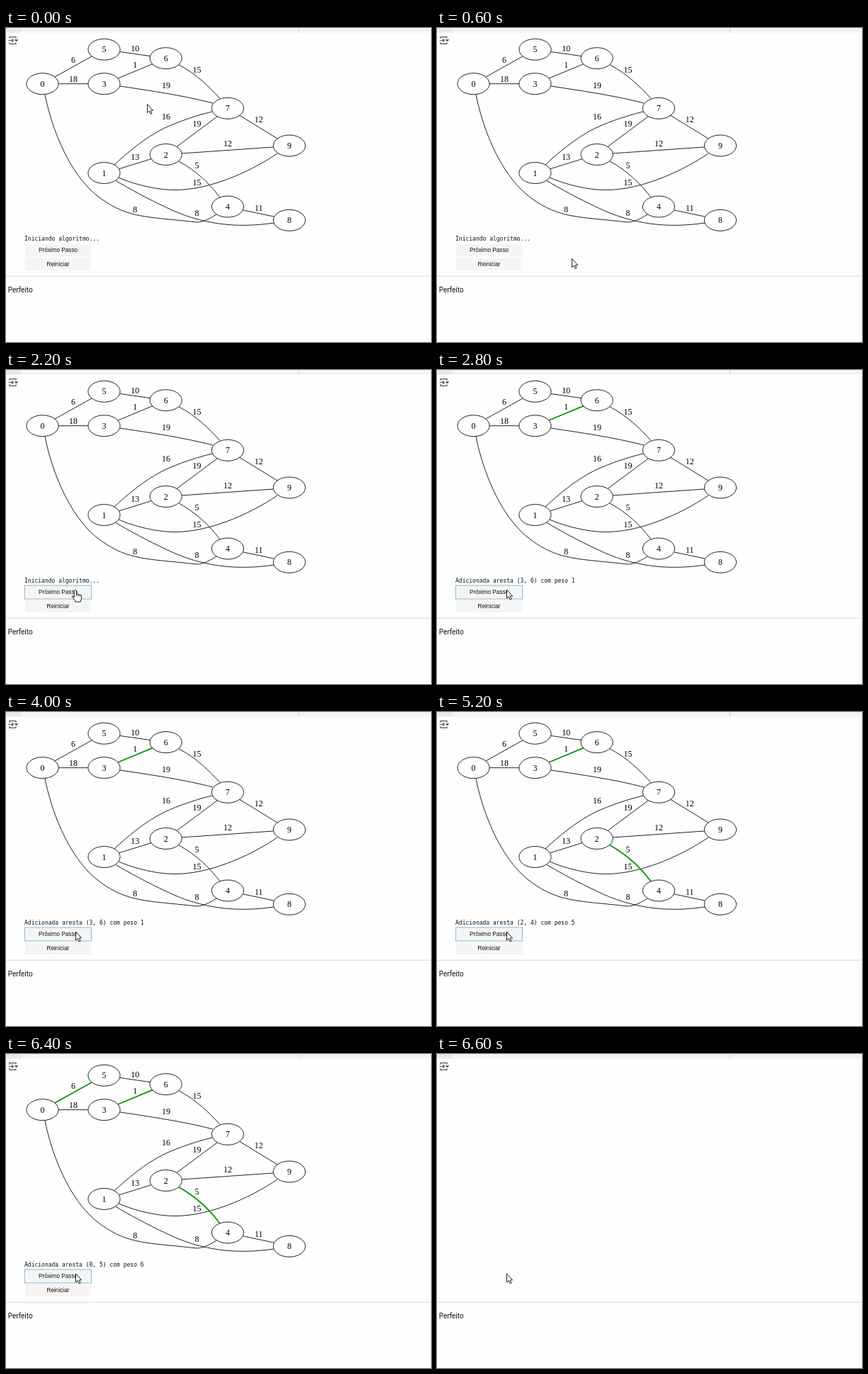
Write an HTML page that moves like this. It is 600 px wide and 443 px high and loops after 8000 ms.

```html
<!DOCTYPE html>
<html lang="pt">
<head>
<meta charset="utf-8">
<style>
html, body { margin: 0; width: 100%; height: 100%; overflow: hidden; background: #fefefe; }
svg { display: block; }
text { fill: #111; }
#graph { fill: none; stroke: #222; stroke-width: 1; }
#graph text { font: 12px "Liberation Serif", serif; text-anchor: middle; fill: #000; stroke: none; }
#graph .added { stroke: #0a930a; stroke-width: 1.8; }
#status { font: 8px "DejaVu Sans Mono", monospace; white-space: pre; }
.button { fill: #f5f5f5; }
.caption { font: 8.2px "Liberation Sans", sans-serif; text-anchor: middle; }
.cursor { fill: #fff; stroke: #222; stroke-width: 1; stroke-linejoin: round; }
</style>
</head>
<body>
<svg width="600" height="443" viewBox="0 0 600 443">
  <rect width="600" height="443" fill="#fefefe"/>
  <rect width="600" height="6.5" fill="#f4f4f5"/>
  <rect width="22" height="6.5" fill="#e9e9ea"/>
  <path d="M413.5 0V6.5" stroke="#d8d8d8"/>
  <path d="M5 15V12.7H14V14.5M5 20V22.3H14V20.5M3.5 17.5H10M8 15.3L10.3 17.5L8 19.7" fill="none" stroke="#555" stroke-width="1.2"/>
  <path d="M11.7 16.2H17.3L14.5 19.2Z" fill="#444"/>
  <path d="M0 350.3H600" stroke="#e3e3e4" stroke-width="1.6"/>
  <text x="2.7" y="373" style="font:10px Roboto,sans-serif">Perfeito</text>
  <g id="output">
    <g id="graph"></g>
    <text id="status" x="26" y="300.3"></text>
    <rect id="shadow" x="26.5" y="306" width="94" height="17.8" rx="1" fill="#c9c9c9"/>
    <rect class="button" id="next" x="27" y="304.5" width="93" height="18"/>
    <rect id="focus" x="26.5" y="304" width="94" height="19" fill="none" stroke="#83b9e0"/>
    <rect class="button" x="27" y="324.5" width="93" height="17.5"/>
    <text class="caption" x="73.5" y="315.7">Próximo Passo</text>
    <text class="caption" x="73.5" y="336">Reiniciar</text>
  </g>
  <path class="cursor" id="arrow" d="M.5 .5V12.6L3.2 10.1L5.1 14.4L7 13.6L5.2 9.4H8.6Z"/>
  <path class="cursor" id="hand" d="M-1.5 11V1.3Q0 -.8 1.5 1.3V6Q3 4.8 4 6.5Q5.6 5.6 6.5 7.2Q8.6 6.6 8.8 9V12Q8.6 14 7.5 15V17H-.2V15.5L-4.3 10.3Q-4.8 8.4 -3 8.6ZM1.5 6V9M4 6.5V9.3M6.5 7.2V9.6"/>
</svg>
<script>
const $ = id => document.getElementById(id);

function add(tag, attributes, content = '') {
  const node = document.createElementNS('http://www.w3.org/2000/svg', tag);
  for (const name in attributes) node.setAttribute(name, attributes[name]);
  node.textContent = content;
  $('graph').append(node);
  return node;
}

// path, weight, label x, label centre y
const edges = [
  ['M69 69L121 40', 6, 95, 45],
  ['M74 78.7H116', 18, 95, 72],
  ['M161 33.5L204 39.7', 10, 182.3, 29],
  ['M158 71L207 50.7', 1, 182.3, 52],
  ['M244 52C268 64 288 84 302 99.5', 15, 269.5, 59],
  ['M161 82C200 88 250 95 292 106', 19, 226, 81],
  ['M153 193C170 177 196 155 222 142C245 131 271 123 291 118', 16, 226, 125],
  ['M241 167.5L298 125', 19, 269.5, 134.5],
  ['M330 123.5L383 156', 12, 356.7, 129],
  ['M248 177L377 168', 12, 313, 163],
  ['M160 198.7L205 184.7', 13, 182.3, 182],
  ['M159 211C177 219 203 226 226 228C280 233 345 203 383 177', 15, 269.5, 218],
  ['M244 188C268 201 288 220 302 239', 5, 269.5, 194],
  ['M55 94C62 130 85 205 133 240C173 269 200 266 269 274C279 274 289 268 297 263', 8, 182.3, 256],
  ['M155 215.5C173 226 200 241 226 253C275 277 325 283 378 275', 8, 269.5, 261],
  ['M335 257L378 266', 11, 356.7, 254]
].map(([d, weight, x, y]) => {
  const line = add('path', { d });
  add('text', { x, y: y + 4 }, weight);
  return line;
});

[[51.5, 78.7], [138.5, 204.5], [225.7, 178.5], [138.5, 78.7], [313, 252],
 [138.5, 30.3], [225.7, 42.7], [313, 113.3], [400, 271.3], [400, 166]].forEach(([cx, cy], label) => {
  add('ellipse', { cx, cy, rx: 22.6, ry: 15 });
  add('text', { x: cx, y: cy + 4 }, label);
});

// start time, edge index, edge name, weight
const steps = [[2800, 3, '3, 6', 1], [5200, 12, '2, 4', 5], [6400, 0, '0, 5', 6]];

// pointer hot spot for each 200 ms tick, the last one stays
const pointer = [[199, 107], [208, 205], [218, 306], [190, 325], [158, 314], [122, 305.5], [99.7, 306.5], [97.8, 310]];

const show = (id, visible) => $(id).style.display = visible ? '' : 'none';

function draw(now) {
  const t = now % 8000;
  let message = 'Iniciando algoritmo...';
  for (const [start, index, name, weight] of steps) {
    const added = t >= start;
    edges[index].classList.toggle('added', added);
    if (added) message = `Adicionada aresta (${name}) com peso ${weight}`;
  }
  if ($('status').textContent !== message) $('status').textContent = message;

  show('output', t < 5600 || (t >= 6400 && t < 6600));
  show('shadow', t >= 1200 && t < 1800);
  show('focus', t >= 1600);
  $('next').style.fill = t >= 1600 && t < 1800 ? '#ededed' : '';

  const hand = t >= 1200 && t < 2800;
  const [x, y] = t >= 2800 ? [98, 309.5] : pointer[Math.min(Math.floor(t / 200), pointer.length - 1)];
  show('hand', hand);
  show('arrow', !hand);
  $(hand ? 'hand' : 'arrow').setAttribute('transform', `translate(${x} ${y})`);
  requestAnimationFrame(draw);
}
draw(performance.now());
</script>
</body>
</html>
```
